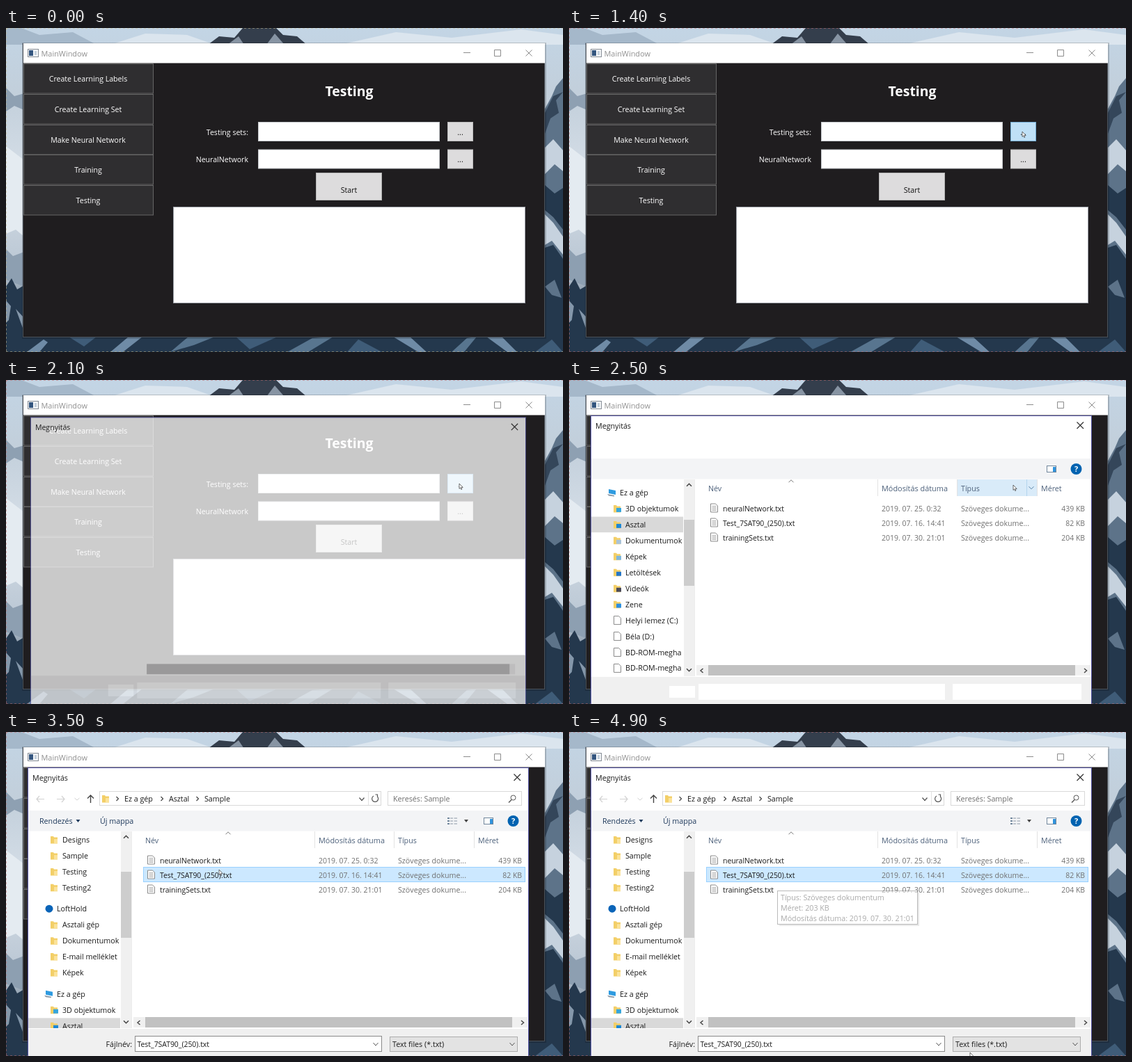
An HTML page that plays this animation: 800x466 px, repeating every 5000 ms.

```html
<!DOCTYPE html>
<html lang="hu">
<head>
<meta charset="utf-8">
<title>MainWindow</title>
<style>
  html, body { margin: 0; width: 100%; height: 100%; overflow: hidden; background: #c9d5e1; }
  svg { display: block; width: 800px; height: 466px; }
  text { font-family: "Open Sans", "Noto Sans", sans-serif; font-size: 10.7px; white-space: pre; }
  .strong { font-size: 10.6px; font-weight: 500; }
</style>
</head>
<body>
<svg id="stage" viewBox="0 0 800 466" xmlns="http://www.w3.org/2000/svg"></svg>
<script>
const LOOP = 5000, STEP = 100;

// Drawing helpers
const rect = (x, y, w, h, fill, stroke) => stroke
  ? `<rect x="${x + .5}" y="${y + .5}" width="${w - 1}" height="${h - 1}" fill="${fill}" stroke="${stroke}"/>`
  : `<rect x="${x}" y="${y}" width="${w}" height="${h}" fill="${fill}"/>`;
const text = (x, y, s, fill = '#1a1a1a', attrs = '') => `<text x="${x}" y="${y}" fill="${fill}" ${attrs}>${s}</text>`;
const size = px => `style="font-size:${px}px"`;
const mid = 'text-anchor="middle"', end = 'text-anchor="end"', strong = 'class="strong"';
const line = (d, color, w = 1) => `<path d="${d}" fill="none" stroke="${color}" stroke-width="${w}"/>`;
const shape = (d, fill) => `<path d="${d}" fill="${fill}"/>`;
const group = (id, body, attrs = '') => `<g id="${id}" ${attrs}>${body}</g>`;
const chevron = (x, y, dx, dy, color = '#555', w = 1) => dx
  ? line(`M${x - dx / 2} ${y - 3}l${dx} 3l${-dx} 3`, color, w)
  : line(`M${x - 3.5} ${y - dy / 2}l3.5 ${dy}l3.5 ${-dy}`, color, w);

function wallpaper() {
  const dark = '#24384d', slate = '#5d7389', snow = '#e4ebf1';
  return rect(0, 0, 800, 466, 'url(#sky)') +
    shape('M0 0H22L48 10 96 6 130 24H0Z', '#a5b8ca') +
    shape('M150 24L200 8 260 10 300 24ZM480 24L560 6 640 14 740 2 800 10V24Z', '#dbe5ee') +
    shape('M290 24L306 12 328 14 340 0H388L398 10 418 12 432 24Z', '#343e4c') +
    shape('M318 24L334 12 342 24ZM374 24L386 8 400 24Z', '#8794a3') +
    shape('M0 86L12 98 26 94V118L12 112 0 120Z', '#8ea0b2') +
    shape('M0 170L26 190V300L14 290 0 296Z', snow) +
    shape('M0 318L10 328 26 322V372L0 362Z', '#8d9fb1') +
    shape('M0 372L8 360 16 376 26 370V466H0Z', dark) +
    shape('M0 392L7 400 4 420 0 424ZM14 404L25 416V434Z', '#8497aa') +
    shape('M800 72L790 84 784 98 772 120V466H800Z', slate) +
    shape('M800 92L790 104 794 122 782 130 774 152V122L786 98Z', '#34465a') +
    shape('M774 172L786 160 800 176V206L788 196 774 210ZM774 268L786 280 800 300V326L784 306 774 312Z', '#c6d2de') +
    shape('M774 226L788 238 800 230V290L786 272 774 262ZM774 316L786 312 800 332V466H774Z', dark) +
    shape('M774 372L788 362 798 388 784 384Z', slate) +
    shape('M0 443H800V466H0Z', dark) +
    shape('M30 466L54 448 60 452 48 466ZM150 466L176 444H196L168 466ZM556 444H580L604 466H592ZM690 444H712L734 466H720Z', '#6f8ba6') +
    shape('M236 466L262 444H300L270 456ZM404 466L440 446 470 444 434 466ZM640 466L662 446 676 444 658 466Z', '#58758f') +
    shape('M90 444H130L112 458ZM330 444H390L350 462ZM490 466L506 448 540 466ZM760 466L784 448 800 466Z', '#3f5c78') +
    group('edge', line('M0 .5H800M.5 0V466M0 465.5H800', 'currentColor'), 'stroke-dasharray="3 3" opacity=".5"');
}

function mainWindow() {
  const menu = ['Create Learning Labels', 'Create Learning Set', 'Make Neural Network', 'Training', 'Testing'];
  const field = y => rect(362, y, 261, 28, '#fff', '#c6c9cd');
  const browse = (y, fill, stroke) => rect(634, y, 37, 28, fill, stroke) + text(652.5, y + 18.5, '...', '#111', mid);
  const label = (x, y, s, anchor) => text(x, y, s, '#fff', `${anchor} ${strong}`);
  return `<rect x="23" y="21" width="753" height="426" fill="#000" opacity=".18"/>` +
    rect(24, 22, 750, 423, '#1f1d1f', '#4a5058') + rect(25, 22, 749, 28.5, '#fff') +
    rect(31, 30, 16, 12, '#f4f6f8', '#858c95') + rect(33, 32, 6, 8, '#34567f') + rect(41, 33, 3, 6, '#c4d0dc') +
    text(50.5, 40.5, 'MainWindow', '#909090', size(10.9)) +
    line('M657 35.5H667M701.5 31.5H710.5V40.5H701.5ZM746.5 31.5L755.5 40.5M755.5 31.5L746.5 40.5', '#8c8c8c') +
    menu.map((s, i) => rect(25, 51 + Math.round(i * 43.75), 187, 43.5, '#2f2e30', '#666') +
      label(118, 77 + i * 43.75, s, mid)).join('') +
    text(493, 98, 'Testing', '#fff', mid + ' style="font-size:19.4px;font-weight:700"') +
    label(348, 153.5, 'Testing sets:', end) + label(348, 193, 'NeuralNetwork', end) +
    field(135) + field(174.5) +
    browse(135, '#dddcdd', '#bcbcbc') + group('hot', browse(135, '#bfe0f6', '#73abd2')) +
    browse(174.5, '#dddcdd', '#bcbcbc') +
    rect(445, 208, 95, 40, '#dddcdd', '#b4b4b4') + text(492.5, 236.5, 'Start', '#111', mid) +
    rect(240, 257, 506, 139, '#fff', '#9a9ea5');
}

// Small icons
const folder = (x, y) => shape(`M${x} ${y - 5}h4l1 1.5h5v9h-10z`, '#f3cf68') + rect(x + 5, y - 1, 5, 6, '#fbe39a');
const drive = (x, y) => `<path d="M${x + .5} ${y - 6}h7l3 3v9h-10z" fill="#fff" stroke="#8a8a8a"/>`;
const page = (x, y) => drive(x, y) + line(`M${x + 2.5} ${y - 2.5}h6m-6 2h6m-6 2h6m-6 2h6`, '#9a9a9a', .8);
const pc = (x, y) => shape(`M${x + 1} ${y - 5}l10 2v6l-10 -2z`, '#2f9be0') + shape(`M${x - 1} ${y + 2}l10 2v1.5l-8 -1z`, '#8796a4');
const disc = (x, y) => `<circle cx="${x + 6}" cy="${y}" r="5.5" fill="#0a64b8"/>`;
const marked = color => (x, y) => folder(x, y) + rect(x + 4, y - 1, 7, 6, color);

// Sidebar entries: offset from the computer node, label, icon, indent
const P = 22.95, kids = (top, list) => list.map(([s, icon], i) => [top + i * P, s, icon || folder, 8]);
const tree = [
  ...kids(-221.8, [['Designs'], ['Sample'], ['Testing'], ['Testing2']]),
  [-122.6, 'LoftHold', disc, 0],
  ...kids(-99.6, [['Asztali gép'], ['Dokumentumok'], ['E-mail melléklet'], ['Képek']]),
  [0, 'Ez a gép', pc, 0],
  ...kids(P, [['3D objektumok', marked('#35a5dc')], ['Asztal', marked('#1c87d6')],
    ['Dokumentumok', marked('#a9c3d8')], ['Képek', marked('#7fb7dc')], ['Letöltések', marked('#2476c8')],
    ['Videók', marked('#4a4a58')], ['Zene', marked('#2d8fe0')], ['Helyi lemez (C:)', drive],
    ['Béla (D:)', drive], ['BD-ROM-megha', drive], ['BD-ROM-megha', drive]])
];

function sidebar() {
  const items = rect(32, 2 * P - 11.3, 132, 22.6, '#d9d9d9') +
    tree.map(([y, s, icon, dx]) => icon(56 + dx, y) + text(73 + dx, y + 4, s)).join('');
  return `<g clip-path="url(#side)">${group('tree', items)}</g>` +
    rect(165, 143, 15, 283, '#f0f0f0') + rect(165, 201, 15, 95, '#cdcdcd') +
    chevron(172.5, 151, 0, -3.5, '#444', 1.5) + chevron(172.5, 417, 0, 3.5, '#444', 1.5) +
    line('M180.5 143V426', '#ececec');
}

const files = [['neuralNetwork.txt', '2019. 07. 25. 0:32', '439 KB'],
  ['Test_7SAT90_(250).txt', '2019. 07. 16. 14:41', '82 KB'],
  ['trainingSets.txt', '2019. 07. 30. 21:01', '204 KB']];

function fileList() {
  const head = '#4c607a', grey = '#707070';
  const bars = [0, 1, 2].map(i => group('row' + i, rect(198, 195 + (i - 1) * 21, 548, 20, '#e5f3ff'))).join('');
  return group('typeHot', rect(557, 143, 115, 24, '#d9ebf9') + line('M657.5 143V167', '#b5d5ee') + chevron(664, 155, 0, 3.5, '#5580a5')) +
    line('M443.5 143V167M557.5 143V167M672.5 143V167', '#e2e2e2') + chevron(319, 145.5, 0, -3.5, '#777') +
    text(200, 159.5, 'Név', head) + text(449, 159.5, 'Módosítás dátuma', head, size(10.9)) +
    text(563, 159.5, 'Típus', head) + text(678, 159.5, 'Méret', head) + bars +
    group('picked', rect(197, 194, 549, 22, '#cce8ff', '#99d1ff')) +
    files.map(([name, date, kb], i) => {
      const y = 184 + i * 21;
      return page(203, y) + text(221, y + 4.5, name, '#1a1a1a', size(10.4)) + text(449, y + 4.5, date, grey, size(10.5)) +
        text(563, y + 4.5, 'Szöveges dokume...', grey) + text(741, y + 4.5, kb, grey, end + ' ' + size(10.4));
    }).join('');
}

function addressBar() {
  const sep = x => chevron(x, 96, 3, 0, '#444', 1.2);
  return line('M55 96.5H44M48 92l-4 4.5l4 4.5M73 96.5H84M80 92l4 4.5l-4 4.5', '#d2d2d2', 1.2) +
    chevron(102, 96.5, 0, 3, '#d2d2d2') + line('M121.5 102V91M117 95.5l4.5 -4.5l4.5 4.5', '#444', 1.4) +
    rect(134, 85, 405, 21, '#fff', '#d9d9d9') + folder(138, 96) +
    sep(160) + text(170, 99.5, 'Ez a gép') + sep(224) + text(234, 99.5, 'Asztal') + sep(275) + text(285, 99.5, 'Sample') +
    chevron(511, 96.5, 0, 4, '#555', 1.3) + line('M520.5 86V105', '#e2e2e2') +
    line('M533 92.5a4.5 4.5 0 1 1 -5 -.5M530.5 90h3v3', '#555', 1.2) +
    rect(548, 85, 193, 21, '#fff', '#d9d9d9') + text(556, 99.5, 'Keresés: Sample', '#6d6d6d') +
    line('M722 101.5l4 -4', '#555', 1.4) + '<circle cx="728.5" cy="94.5" r="3.5" fill="none" stroke="#555"/>';
}

function dialog() {
  const blue = '#1e395b';
  const toolbar = rect(32, 113, 718, 29.5, '#f3f4f6') +
    rect(686, 123, 14, 10, '#fff', '#71879c') + rect(695, 125, 4, 7, '#2f93dd') +
    '<circle cx="728.5" cy="128" r="8" fill="#0063b1"/>' +
    text(728.5, 132, '?', '#fff', mid + ' style="font-size:11px;font-weight:700"');
  const tools = text(48, 132, 'Rendezés', blue) + shape('M100.5 126h6l-3 4z', blue) + text(135, 132, 'Új mappa', blue) +
    [124, 128, 132].map(y => rect(634, y - 1, 3, 2, '#71879c') + line(`M638 ${y}H642M643.5 ${y}H648`, '#8a97a5')).join('') +
    shape('M658 126h6l-3 4z', '#444');
  const track = rect(183, 410, 566, 15, '#f0f0f0');
  const thumb = rect(200, 410, 527, 15, '#c1c1c1');
  const footer = rect(32, 427, 718, 53, '#f0f0f0');
  const blanks = rect(144, 440, 37, 17, '#fff') + rect(186, 437, 354, 23, '#fff') + rect(551, 437, 185, 23, '#fff');
  const fields = text(181, 453, 'Fájlnév:', '#1a1a1a', end) + rect(185, 437, 355, 23, '#fff', '#8a8a8a') +
    group('focus', rect(185, 437, 355, 23, 'none', '#2b88d8') + line('M190.5 441V456', '#222')) +
    group('fileName', text(188.5, 453, files[1][0], '#1a1a1a', size(10.4))) + chevron(531, 449, 0, 4) +
    rect(551, 438, 184, 22, '#e3e3e3', '#adadad') + text(555, 453, 'Text files (*.txt)') + chevron(727, 449, 0, 4);
  return rect(31, 51, 720, 430, '#fff', '#5252a3') + text(38, 69.5, 'Megnyitás') +
    line('M729.5 60.5L739 70M739 60.5L729.5 70', '#333', 1.2) +
    rect(727, 410, 8, 15, '#f0f0f0') + thumb + footer +
    group('blanks', blanks) +
    group('body', toolbar + sidebar() + fileList() + track + thumb +
      line('M192.5 415l-3.5 3l3.5 3M740 415l3.5 3l-3.5 3', '#444', 1.5)) +
    group('controls', addressBar() + tools + fields);
}

const tooltip = () => rect(302, 231, 201, 48, '#d5d5d5') + rect(299, 228, 202, 49, '#fff', '#777') +
  ['Típus: Szöveges dokumentum', 'Méret: 203 KB', 'Módosítás dátuma: 2019. 07. 30. 21:01']
    .map((s, i) => text(304, 242 + i * 15.2, s, '#575757')).join('');

document.getElementById('stage').innerHTML =
  `<defs><linearGradient id="sky" x2="0" y2="1">
    <stop offset="0" stop-color="#c3d5e5"/><stop offset=".2" stop-color="#c2cfdb"/>
    <stop offset=".45" stop-color="#d5dee7"/><stop offset=".75" stop-color="#b9c6d3"/>
    <stop offset="1" stop-color="#24384d"/></linearGradient>
  <clipPath id="side"><rect x="32" y="143" width="132" height="283"/></clipPath></defs>` +
  wallpaper() + mainWindow() + group('dialog', dialog()) + group('tip', tooltip()) +
  group('cursor', '<path d="M0 0V7.4L1.6 5.9 2.8 8.5 3.9 8 2.8 5.5H5.2Z" fill="#fff" stroke="#333" stroke-width=".7"/>');

const el = id => document.getElementById(id);
const show = (id, on) => el(id).setAttribute('visibility', on ? 'inherit' : 'hidden');

// Value of a piecewise linear track [[time, ...values], ...]
function track(keys, t) {
  if (t <= keys[0][0]) return keys[0].slice(1);
  const i = keys.findIndex(k => k[0] >= t);
  if (i < 0) return keys[keys.length - 1].slice(1);
  const a = keys[i - 1], b = keys[i], f = (t - a[0]) / (b[0] - a[0]);
  return a.slice(1).map((v, n) => v + (b[n + 1] - v) * f);
}

const pointer = [[500, 610, 470], [800, 640, 230], [1000, 651, 149], [2300, 651, 149], [2500, 638, 151],
  [2600, 600, 170], [2800, 380, 230], [2900, 305, 222], [3000, 298, 213], [3100, 302, 206], [3500, 306, 198],
  [4100, 306, 198], [4300, 298, 213], [4500, 298, 213], [4600, 360, 260], [4700, 500, 370], [4800, 608, 440], [4900, 576, 461]];
const opening = [[1800, 0, .96], [2000, .45, .979], [2100, .76, .989], [2200, .93, .996], [2300, 1, 1]];
const tipFade = [[4400, 0], [4500, .9], [4700, .9], [4900, .5]];

function render(t) {
  const [x, y] = track(pointer, t), [alpha, scale] = track(opening, t);
  el('cursor').setAttribute('transform', `translate(${x} ${y})`);
  el('edge').setAttribute('color', t < 700 ? '#c9b98a' : '#c46f6f');

  show('hot', t >= 1000);
  show('dialog', alpha > 0);
  el('dialog').setAttribute('opacity', alpha);
  el('dialog').setAttribute('transform', `translate(391 265) scale(${scale}) translate(-391 -265)`);

  const ready = t >= 2700, picked = t >= 3300;
  show('body', t >= 2400);
  show('controls', ready);
  show('blanks', !ready);
  el('tree').setAttribute('transform', `translate(0 ${ready ? 376.8 : 162})`);
  show('typeHot', t >= 2400 && t < 2600);

  const row = t < 2800 || t > 3200 ? -1 : t <= 3000 ? 2 : 1;
  files.forEach((_, i) => show('row' + i, i === row));
  show('picked', picked);
  show('focus', ready && !picked);
  show('fileName', picked);
  el('tip').setAttribute('opacity', track(tipFade, t)[0]);
}

const start = performance.now();
function tick() {
  const t = (performance.now() - start) % LOOP;
  render(Math.floor(t / STEP) * STEP);
  requestAnimationFrame(tick);
}
render(0);
requestAnimationFrame(tick);
</script>
</body>
</html>
```
